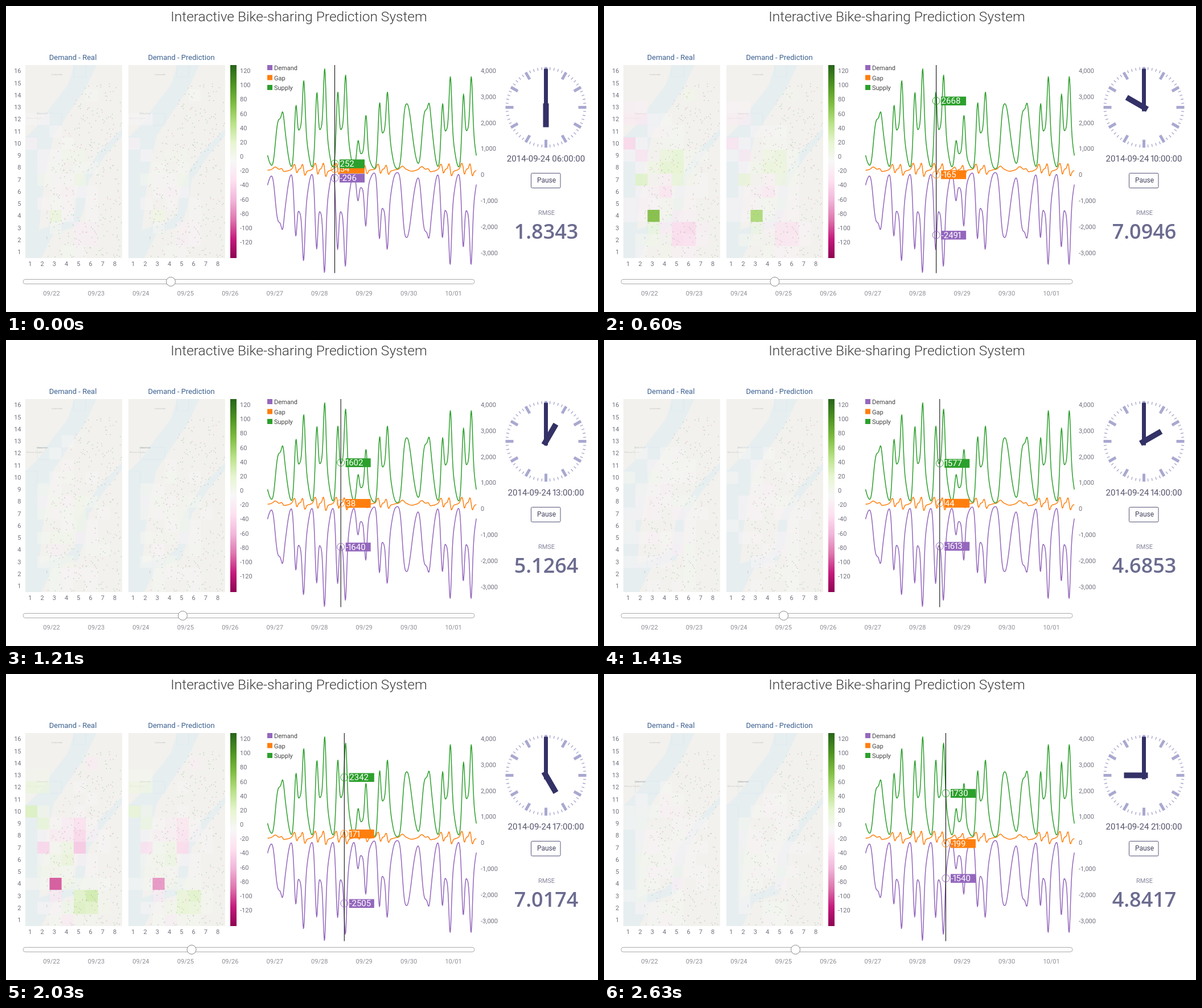
These frames come from a looping animation (1040 by 539 pixels, 2.83 s). An HTML page:

```html
<!DOCTYPE html>
<html lang="en">
<head>
<meta charset="utf-8">
<title>Prediction dashboard</title>
<style>
html, body { margin: 0; width: 100%; height: 100%; overflow: hidden; background: #fff; }
svg { display: block; width: 1040px; height: 539px; font: 11px Roboto, sans-serif; fill: #70707e; }
.mid { text-anchor: middle; }
.end { text-anchor: end; }
.head { text-anchor: middle; font-size: 13px; fill: #3c6090; }
#title { font-size: 24.5px; font-weight: 300; fill: #3c3c3c; }
#rmse { font: 600 36px 'Open Sans', 'Noto Sans', sans-serif; fill: #6b6b90; }
</style>
</head>
<body>
<svg id="stage" viewBox="0 0 1040 539"></svg>
<script>
const LOOP = 2830, CELL = 21.25, ZERO = 289.3, UNIT = 0.0458, DAY = 36.75;
const SERIES = [['Demand', '#9467bd'], ['Gap', '#ff7f0e'], ['Supply', '#2ca02c']];
const MAPS = [34, 215];
const stage = document.getElementById('stage');

// start in ms, hour of day, error, then demand, gap and supply
const steps = [
  [0, 6, '1.8343', -296, 54, 252],
  [400, 8, '6.6813', -2050, 233, 1796],
  [600, 10, '7.0946', -2491, -165, 2668],
  [1010, 11, '6.9128', -1595, -140, 1734],
  [1210, 13, '5.1264', -1640, 38, 1602],
  [1410, 14, '4.6853', -1613, 44, 1577],
  [1830, 16, '6.2038', -2080, 142, 1938],
  [2030, 17, '7.0174', -2505, 171, 2342],
  [2430, 19, '5.8392', -3480, -75, 3560],
  [2630, 21, '4.8417', -1540, -199, 1730]
];

const list = (n, f) => Array.from({ length: n }, (_, i) => f(i)).join('');
const text = (x, y, s, attr = '') => `<text x="${x}" y="${y}" ${attr}>${s}</text>`;
const rect = (x, y, w, h, fill, attr = '') =>
  `<rect x="${x}" y="${y}" width="${w}" height="${h}" fill="${fill}" ${attr}/>`;
const line = (x1, y1, x2, y2, color, w) =>
  `<line x1="${x1}" y1="${y1}" x2="${x2}" y2="${y2}" stroke="${color}" stroke-width="${w}"/>`;
// the digit 1 sits tighter than the others
const tight = s => s.replace(/1/g, '<tspan dx="-1.5" style="letter-spacing:-2px">1</tspan>');
const random = seed => () => (seed = (seed * 16807) % 2147483647) / 2147483647;
const gauss = (d, s) => Math.exp(-d * d / (2 * s * s));

// diverging colour scale
const SCALE = ['8e0152', 'c51b7d', 'de77ae', 'f1b6da', 'fde0ef', 'f7f7f7',
  'e6f5d0', 'b8e186', '7fbc41', '4d9221', '276419'];
const rgb = h => [0, 2, 4].map(i => parseInt(h.substr(i, 2), 16));
function tone(v) {
  const p = Math.max(0, Math.min(9.999, (v / 135 + 1) * 5)), i = Math.floor(p);
  const a = rgb(SCALE[i]), b = rgb(SCALE[i + 1]);
  return `rgb(${a.map((c, k) => Math.round(c + (b[k] - c) * (p - i)))})`;
}

// districts that fill in the morning rush and empty in the evening:
// column, row, strength, radius
const hubs = [
  [3, 4, 130, 0.33], [5.5, 2.6, -76, 0.8], [4.6, 8.4, 52, 0.9], [5, 7, 42, 0.4],
  [2, 7, 46, 0.3], [4, 6.5, -48, 0.55], [1.5, 12.2, -40, 0.6], [1, 10, -48, 0.3],
  [2, 9.3, -40, 0.5], [4, 1, 24, 0.3], [6, 14, 18, 0.4], [3, 2.7, 20, 0.6], [2.3, 5.3, -20, 0.7]
];
const commute = h => gauss(h - 8.6, 1.4) - 0.7 * gauss(h - 17.3, 1.4);
const flow = (c, r) => hubs.reduce((sum, [hc, hr, w, s]) => sum + w * gauss(Math.hypot(c - hc, r - hr), s), 0);

function cells(hour, gain, x0) {
  const rnd = random(hour * 977), rush = commute(hour);
  return list(128, i => {
    const c = i % 8 + 1, r = (i >> 3) + 1, core = gauss(c - 4, 1.8) * gauss(r - 6, 4);
    const v = gain * (flow(c, r) * rush + (rnd() - 0.5) * 24 * core * Math.min(1, (hour - 4) / 4));
    if (Math.abs(v) < 2) return '';
    const alpha = Math.min(0.95, 0.55 + Math.abs(v) / 100);
    return rect(x0 + (c - 1) * CELL, 444 - r * CELL, CELL, CELL, tone(v), `opacity="${alpha.toFixed(2)}"`);
  });
}

// pale city map and its stations
const baseMap = `
  ${rect(0, 0, 170, 340, '#f2f1ed')}
  <g fill="#e7eef0">
    <path d="M86 0H125L104 44 74 88 50 124 38 176 30 230 24 290 40 285 70 276 86 262 92 215 104 190 112 198 104 250 92 284 50 296 28 340H0V128L24 104 46 72 74 36Z"/>
    <path d="M104 190L132 150 170 112V124L140 160 114 200Z"/>
  </g>
  <path d="M85 0V21H106V0M21 85H64V106H21ZM0 127H21V156M42 276H64V297H42Z" fill="none" stroke="#d6e8ee" stroke-width="0.7"/>
  <g font-size="4" fill="#8d8d8d">
    ${text(20, 86.5, 'Oakenford', 'opacity="0.9"')}
    ${text(46, 18, 'Lindenvale', 'opacity="0.5"')}
    ${text(2, 95, 'Marrow Heights', 'opacity="0.4"')}
  </g>`;
const rnd = random(11);
const dots = list(460, () => {
  const x = rnd() * 166 + 2, y = 32 + rnd() * 306, hue = rnd();
  const wet = x < Math.max(36, 112 - y * 0.4) || (y > 190 && y < 262 && x > 92 && x < 112);
  const fill = hue < 0.45 ? '#6fae78' : hue < 0.75 ? '#d58fa8' : '#96969a';
  return wet ? '' : rect(x.toFixed(1), y.toFixed(1), 1.4, 1.4, fill);
});

// supply in pixels: each day is a few bumps placed around its morning rush
const bump = (d, h, left, right, power = 2) =>
  h * Math.exp(-Math.pow(Math.abs(d) / (d < 0 ? left : right), power));
function workday(d, am, mid, pm) {
  return bump(d - 10, mid, 10, 12.5, 3) + bump(d, am - mid * 0.37, 3.8, 3) +
    bump(d - 14, pm - mid * 0.97, 3.1, 3.1);
}
const saturday = (d, h) => d < 11.5 ? bump(d - 11.5, h, 9, 9, 3) : bump(d - 11.5, h, 12, 12);
const sunday = (d, h) => bump(d - 8.8, h, 9.2, 13.5, 3) + bump(d - 14, 17, 3, 3);
const week = [
  d => saturday(d, 70), d => sunday(d, 88),
  d => workday(d, 111, 72, 156), d => workday(d, 134, 72, 177), d => workday(d, 135, 72, 166),
  d => workday(d + 1, 50, 28, 95), d => workday(d, 116, 66, 136),
  d => saturday(d, 115), d => sunday(d, 104),
  d => workday(d - 0.3, 114, 70, 163), d => workday(d - 0.3, 131, 70, 163)
];
const supply = x => 2 + week.reduce((sum, day, k) => sum + day(x - 472.4 - DAY * (k - 1)), 0);
const ahead = x => supply(x + 0.38) + 1.5;
const plot = (f, color) => {
  const pts = list(490, i => {
    const x = 459.5 + i * 0.75;
    return `${x},${(ZERO - f(x)).toFixed(1)} `;
  });
  return `<polyline points="${pts}" fill="none" stroke="${color}" stroke-width="1.5" stroke-linejoin="round"/>`;
};

// fixed parts
const dayName = i => new Date(Date.UTC(2014, 8, 22 + i)).toISOString().slice(5, 10).replace('-', '/');
const spin = (deg, y1, y2, color, w) =>
  `<g transform="rotate(${deg} 948.5 178.5)">${line(948.5, 178.5 - y1, 948.5, 178.5 - y2, color, w)}</g>`;

stage.innerHTML = `
  <defs>
    <linearGradient id="bar" x1="0" y1="1" x2="0" y2="0">
      ${list(11, i => `<stop offset="${i / 10}" stop-color="#${SCALE[i]}"/>`)}
    </linearGradient>
    <clipPath id="frame"><rect width="170" height="340"/></clipPath>
    <g id="base" clip-path="url(#frame)">${baseMap}</g>
    <g id="dots" opacity="0.5">${dots}</g>
  </defs>
  ${text(514.5, 27, 'Interactive Bike-sharing Prediction System', 'id="title" class="mid"')}
  ${text(117.5, 95, 'Demand - Real', 'class="head"')}
  ${text(308, 95, 'Demand - Prediction', 'class="head"')}
  ${MAPS.map(x => `<use href="#base" x="${x}" y="104"/>`).join('')}
  <g id="heat"></g>
  ${MAPS.map(x => `<use href="#dots" x="${x}" y="104"/>`).join('')}
  ${list(16, i => text(26.5, 437 - i * CELL, i + 1, 'class="end"'))}
  ${MAPS.map(x => list(8, i => text(x + 8.3 + i * CELL, 458, i + 1, 'class="mid"'))).join('')}
  ${rect(394, 104, 11, 340, 'url(#bar)')}
  ${list(13, i => text(411, 118 + i * 25.17, 120 - i * 20))}
  ${list(8, i => text(834, 118 + i * 45.8, (4000 - i * 1000).toLocaleString('en-US')))}
  ${plot(x => -ahead(x), SERIES[0][1])}
  ${plot(x => ahead(x) - supply(x), SERIES[1][1])}
  ${plot(supply, SERIES[2][1])}
  ${SERIES.map(([s, c], i) => rect(459, 104 + i * 17.5, 9, 9, c) +
    text(471, 113 + i * 17.5, s, 'fill="#444"')).join('')}
  <g id="cursor"></g>
  <rect x="30" y="481.5" width="793" height="8" rx="4" fill="#fff" stroke="#aaa"/>
  <circle id="knob" cy="485.5" r="8" fill="#fff" stroke="#888"/>
  ${list(10, i => text(80 + i * 78.45, 510, dayName(i), 'class="mid" fill="#8d8d96"'))}
  ${list(60, i => i % 5 ? spin(i * 6, 66, 71, '#a9a8d0', 1.4) : spin(i * 6, 57, 71, '#a9a8d0', 5))}
  ${spin(0, -7, 68, '#333166', 7)}
  <g id="hand">${line(948.5, 185.5, 948.5, 143.5, '#333166', 10)}</g>
  <text id="date" class="mid" x="948.5" y="274" font-size="15" fill="#55556e"></text>
  <rect x="922.5" y="294.5" width="51.5" height="26" rx="2" fill="#fff" stroke="#55557a"/>
  ${text(949.5, 311, 'Pause', 'class="mid" font-size="12" fill="#444460"')}
  ${text(949.5, 368, 'RMSE', 'class="mid" fill="#85859c"')}
  <text id="rmse" class="mid" x="949" y="410"></text>`;

const el = id => document.getElementById(id);
function marker(x, v, color) {
  const y = ZERO - v * UNIT;
  return `<circle cx="${x}" cy="${y}" r="6.5" fill="none" stroke="${color}"/>` +
    rect(x + 8.5, y - 7.5, 44, 15.5, color) +
    text(x + 9, y + 5.3, tight(String(v)), 'font-size="15" fill="#fff"');
}

function show(i) {
  const [, hour, rmse, ...vals] = steps[i], x = 577.5 + (hour - 6) * 1.53;
  el('heat').innerHTML = cells(hour, 1, MAPS[0]) + cells(hour, 0.75, MAPS[1]);
  el('cursor').innerHTML = line(x, 104, x, 470.5, '#111', 1.1) +
    vals.map((v, k) => marker(x, v, SERIES[k][1])).join('');
  el('knob').setAttribute('cx', 289.5 + i * 5.22);
  el('hand').setAttribute('transform', `rotate(${hour * 30} 948.5 178.5)`);
  el('date').innerHTML = '2014-09-24 ' + tight(String(hour).padStart(2, '0')) + ':00:00';
  el('rmse').textContent = rmse;
}

const start = performance.now();
let shown = -1;
function tick() {
  const t = (performance.now() - start) % LOOP;
  let i = steps.length - 1;
  while (steps[i][0] > t) i--;
  if (i !== shown) show(shown = i);
  requestAnimationFrame(tick);
}
tick();
</script>
</body>
</html>
```
